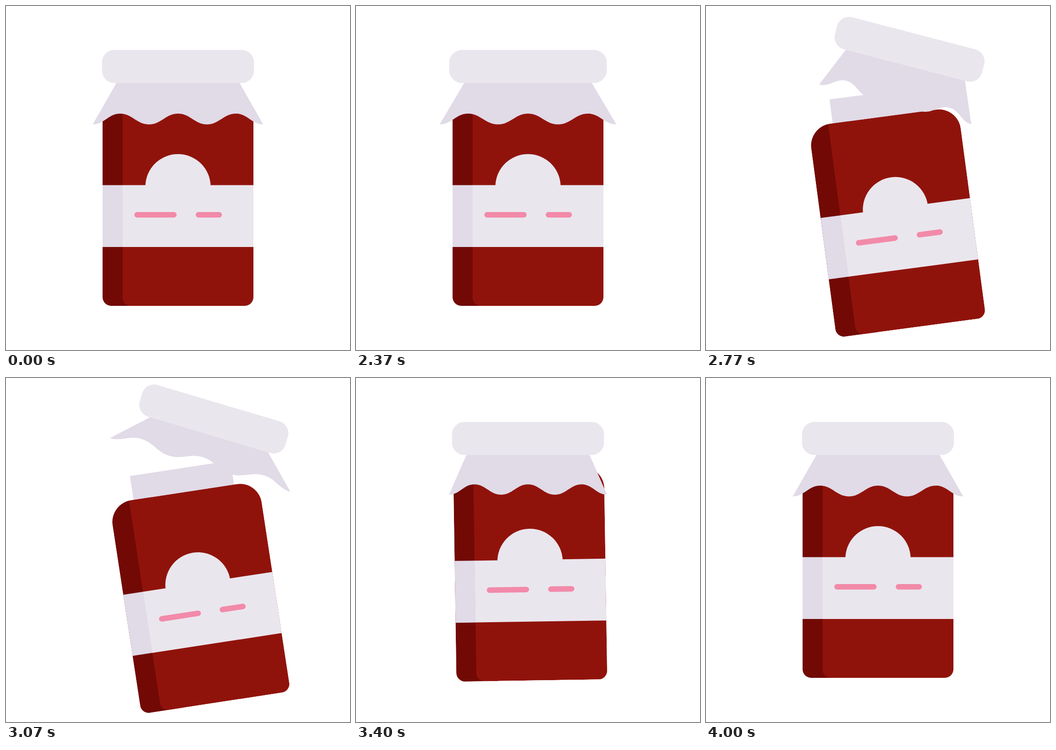
Write an HTML page that moves like this. It is 748x748 px and loops after 4.02 s.

```html
<!DOCTYPE html>
<html lang="en">
<head>
<meta charset="utf-8">
<title>Jam jar</title>
<style>
  html, body { margin: 0; height: 100%; overflow: hidden; background: #fff; }
  svg { display: block; width: 100vw; height: 100vh; }
</style>
</head>
<body>
<svg viewBox="0 0 748 748">
  <g id="jar">
    <rect x="263.5" y="136.5" width="221" height="80" fill="#e1dae7"/>
    <clipPath id="glass">
      <path d="M210 237a48 48 0 0 1 48-48H490a48 48 0 0 1 48 48V633a19 19 0 0 1-19 19H229a19 19 0 0 1-19-19Z"/>
    </clipPath>
    <g clip-path="url(#glass)">
      <path fill="#720905" d="M205 185H300V655H205Z"/>
      <path fill="#90130b" d="M253.5 185H545V652H271.5a18 18 0 0 1-18-18Z"/>
      <path fill="#e1dae7" d="M205 389.5H254V524H205Z"/>
      <path fill="#eae6ed" d="M253.5 389.5H545V524H253.5Z"/>
    </g>
    <circle cx="374" cy="393" r="71" fill="#eae6ed"/>
    <path d="M285 454h80M418.5 454h45" stroke="#f28aa9" stroke-width="12" stroke-linecap="round"/>
  </g>
  <g id="lid">
    <path id="cloth" fill="#e1dae7"/>
    <rect x="-165.3" y="-36" width="330.6" height="72" rx="27" fill="#eae6ed"/>
  </g>
</svg>
<script>
const LOOP = 4020, START = 2020;
const [jar, lid, cloth] = ['jar', 'lid', 'cloth'].map(id => document.getElementById(id));

const span = (t, a, b) => Math.min(1, Math.max(0, (t - a) / (b - a)));
const smooth = u => u * u * (3 - 2 * u);
const cubic = u => u < .5 ? 4 * u ** 3 : 1 - 4 * (1 - u) ** 3;
const mix = (a, b, u) => a.map((v, i) => v + (b[i] - v) * u);

function bezier(x1, y1, x2, y2) {
  const at = (a, b, s) => 3 * a * s * (1 - s) ** 2 + 3 * b * s * s * (1 - s) + s ** 3;
  return u => {
    let lo = 0, hi = 1;
    for (let i = 0; i < 24; i++) {
      const mid = (lo + hi) / 2;
      if (at(x1, x2, mid) < u) lo = mid; else hi = mid;
    }
    return at(y1, y2, hi);
  };
}
const opening = bezier(.35, .05, .15, 1);
const closing = bezier(.79, 0, .55, 1);

// How far the jar or the lid is tipped; they shut at different times.
const tip = (t, shut) => t < 3000
  ? 1.012 * opening(span(t, 2496, 2996))
  : 1.012 * (1 - closing(span(t, 3000, shut)));

// Hem width and cloth height, relative to rest.
const REST = [1, 1], NARROW = [.904, 1], LIFTED = [1.107, .757], FALLEN = [.922, .964];
function hem(t) {
  if (t < 2625) return mix(REST, NARROW, smooth(span(t, 2500, 2625)));
  if (t < 3135) return mix(NARROW, LIFTED, cubic(span(t, 2625, 3135)));
  if (t < 3430) return mix(LIFTED, FALLEN, smooth(span(t, 3135, 3430)));
  return mix(FALLEN, REST, smooth(span(t, 3430, 3520)));
}

function clothPath([sx, sy]) {
  const xs = [-185.3, -126, -63, 0, 63, 126, 185.3].map(x => x * sx);
  const y = i => 36 + (i % 2 ? 66.5 : 90) * sy;
  let d = `M-134 30V36L${xs[0]} ${y(0)}`;
  for (let i = 1; i < xs.length; i++) {
    const k = (xs[i] - xs[i - 1]) * .42;
    d += `C${xs[i - 1] + k} ${y(i - 1)} ${xs[i] - k} ${y(i)} ${xs[i]} ${y(i)}`;
  }
  return d + 'L134 36V30Z';
}

function draw() {
  const now = performance.now() % LOOP;
  const t = now < START ? 0 : now;
  const p = tip(t, 3500), q = tip(t, 3400);
  const swell = Math.sin(Math.PI * span(t, 2000, 2500)) + Math.sin(Math.PI * span(t, 3500, 4000));
  jar.setAttribute('transform', `translate(${43.5 * p} ${57 * p}) rotate(${-8.7 * p} 374 393)`);
  lid.setAttribute('transform',
    `translate(${374 + 78.5 * q} ${131.5 - 42.7 * q}) rotate(${16.7 * q}) scale(${1 + .05 * swell} 1)`);
  cloth.setAttribute('d', clothPath(hem(t)));
  requestAnimationFrame(draw);
}
draw();
</script>
</body>
</html>
```
